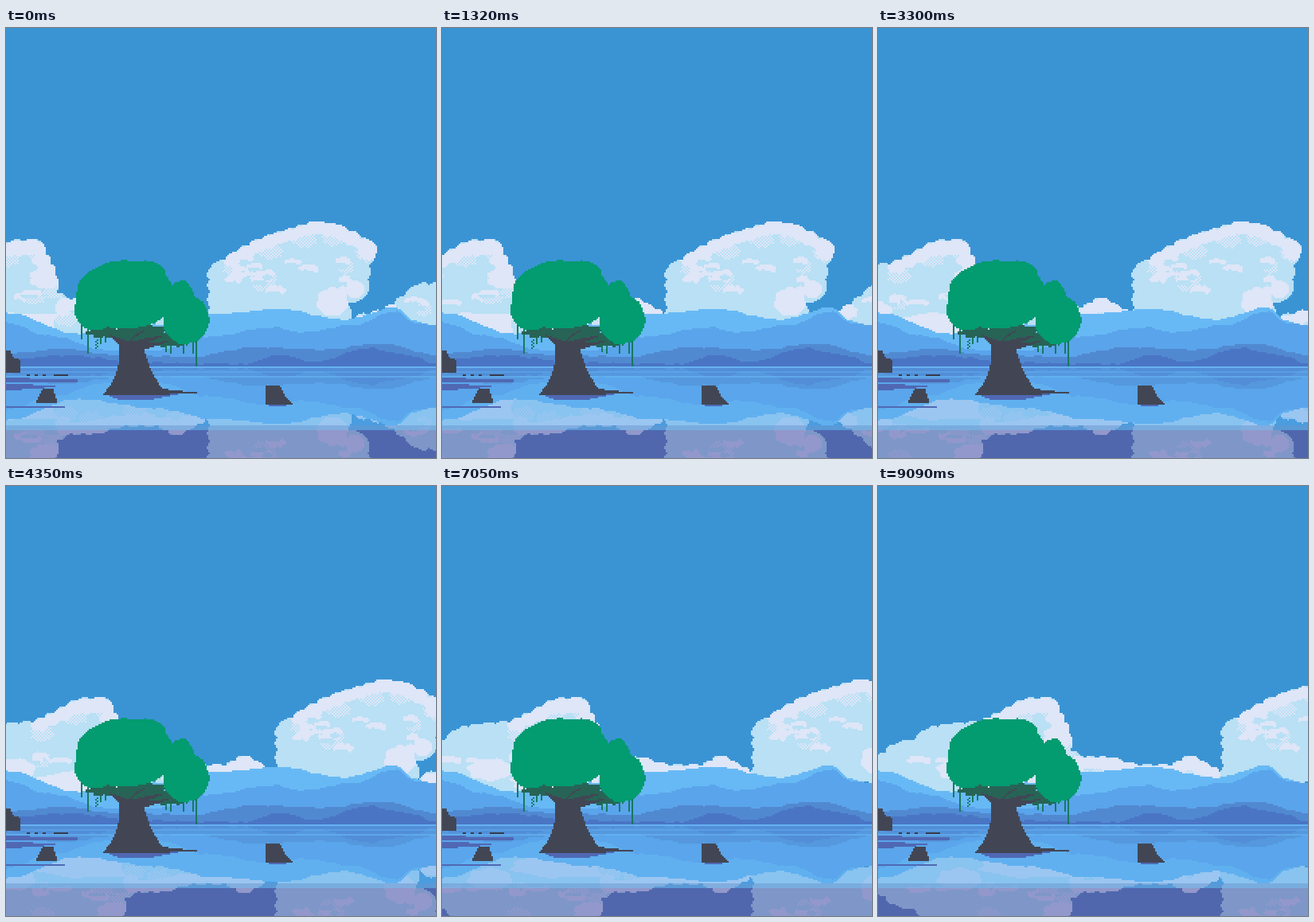
An HTML page with a canvas for the animation above (9.12 s loop, 540x540 px).

```html
<!DOCTYPE html>
<html lang="en">
<head>
<meta charset="utf-8">
<title>Lake</title>
<style>
  html, body { margin: 0; width: 100%; height: 100%; overflow: hidden; background: #3a94d4; }
  canvas { display: block; width: 540px; height: 540px; image-rendering: pixelated; }
</style>
</head>
<body>
<canvas id="stage" width="540" height="540"></canvas>
<script>
const ctx = document.getElementById('stage').getContext('2d');
ctx.imageSmoothingEnabled = false;
const LOOP = 9120, LEFT = 200, HORIZON = 425, SHORE = 505;
const SKY = '#3a94d4', TAU = Math.PI * 2;

function random(seed) {
  return (min, max) => {
    seed = (seed * 16807) % 2147483647;
    return min + (max - min) * seed / 2147483647;
  };
}
const pairs = flat => flat.flatMap((x, i) => i % 2 ? [] : [[x, flat[i + 1]]]);

// Layers hold art pixels of 2 x 2 stage pixels, whose rows start on odd stage rows.
function layer(width, left = 0) {
  const g = document.createElement('canvas').getContext('2d');
  g.canvas.width = width / 2;
  g.canvas.height = 270;
  g.translate(left / 2, 0);
  return g;
}

// Hard-edged polygon fill in stage coordinates, optionally as a checkerboard.
function poly(g, points, color, dither = false) {
  const pts = points.map(([x, y]) => [x / 2, (y - 1) / 2]);
  const ys = pts.map(p => p[1]);
  const end = Math.min(270, Math.ceil(Math.max(...ys)));
  g.fillStyle = color;
  for (let row = Math.max(0, Math.floor(Math.min(...ys))); row < end; row++) {
    const y = row + .5, cuts = [];
    pts.forEach(([x1, y1], i) => {
      const [x2, y2] = pts[(i + 1) % pts.length];
      if (y1 <= y !== y2 <= y) cuts.push(x1 + (y - y1) / (y2 - y1) * (x2 - x1));
    });
    cuts.sort((a, b) => a - b);
    for (let i = 0; i + 1 < cuts.length; i += 2) {
      const a = Math.round(cuts[i]), b = Math.round(cuts[i + 1]);
      if (!dither) g.fillRect(a, row, b - a, 1);
      else for (let x = a + ((a + row) & 1); x < b; x += 2) g.fillRect(x, row, 1, 1);
    }
  }
}

const bar = (g, x, y, w, h, color) => poly(g, [[x, y], [x + w, y], [x + w, y + h], [x, y + h]], color);

function blob(g, cx, cy, rx, ry, color, rough = .04, dither = false) {
  const pts = [];
  for (let a = 0; a < TAU; a += TAU / 40) {
    const r = 1 + rough * Math.sin(a * 7 + cx + cy);
    pts.push([cx + Math.cos(a) * rx * r, cy + Math.sin(a) * ry * r]);
  }
  poly(g, pts, color, dither);
}

// Limb that tapers from its root to a point.
const limb = (g, x, y, tipX, tipY, w, color) =>
  poly(g, [[x - w / 2, y + w / 2], [tipX, tipY], [x + w / 2, y - w / 2]], color);

// Cloud with puffs along a clockwise rim and light patches clipped to its body.
function cloud(g, { rim, seed, lit, box, count, spots = [] }, base, light) {
  const c = layer(540 + LEFT, LEFT), rand = random(seed);
  const corners = pairs(rim), outline = [], lumps = [];
  corners.forEach(([x, y], i) => {
    const [x2, y2] = corners[(i + 1) % corners.length];
    const dx = x2 - x, dy = y2 - y, length = Math.hypot(dx, dy);
    const puffs = Math.max(1, Math.round(length / 17));
    for (let k = 0; k < puffs * 5; k++) {
      const s = k / puffs / 5, out = 3 * Math.sin(k % 5 / 5 * Math.PI) / length;
      outline.push([x + dx * s + dy * out, y + dy * s - dx * out]);
      if (k % 5 === 2) lumps.push([x + dx * s - dy / length * 6, y + dy * s + dx / length * 6]);
    }
  });
  poly(c, outline, base);
  c.globalCompositeOperation = 'source-atop';

  const shown = lumps.filter(([x, y]) => x > lit[0] && x < lit[1] && y < lit[2]);
  shown.forEach(([x, y], i) => i % 3 || blob(c, x + 4, y + 11, 15, 10, light, .1, true));
  shown.forEach(([x, y]) => blob(c, x, y, rand(11, 15), rand(7, 10), light, .08));
  for (let i = 0; i < count; i++) {
    const x = rand(box[0], box[2]), y = rand(box[1], box[3]);
    const rx = rand(7, 15), ry = rand(4, 7);
    if (i % 4 === 0) blob(c, x + 3, y + 7, rx, ry + 3, light, .1, true);
    blob(c, x, y, rx, ry, light, .1);
    blob(c, x - 2, y + ry, rx * .8, ry * .7, base, .1);
  }
  spots.forEach(s => blob(c, ...s, light, .07));
  g.drawImage(c.canvas, -LEFT / 2, 0);
}

const CLOUDS = [
  { seed: 11, lit: [-55, 70, 330], box: [-160, 325, 40, 350], count: 7,
    rim: [-200,400, -180,343, -158,325, -133,320, -116,305, -88,300, -51,297, -24,285,
      4,269, 42,267, 50,284, 62,308, 64,332, 88,348, 92,400],
    spots: [[20, 277, 26, 9], [-76, 356, 28, 14], [46, 314, 16, 13], [20, 372, 70, 14]] },
  { seed: 5, lit: [60, 255, 365], box: [90, 354, 240, 358], count: 0,
    rim: [60,400, 66,341, 112,342, 150,352, 190,352, 215,339, 252,360, 256,400] },
  { seed: 8, lit: [430, 492, 370], box: [510, 340, 540, 355], count: 2,
    rim: [432,400, 438,363, 474,355, 500,337, 518,322, 545,323, 560,400] },
  { seed: 29, lit: [250, 470, 300], box: [285, 288, 440, 332], count: 15,
    rim: [255,372, 256,330, 255,303, 275,290, 305,272, 335,260, 364,251, 390,244, 416,248,
      445,262, 466,275, 456,298, 453,335, 430,346, 432,370],
    spots: [[410, 344, 20, 18], [438, 328, 12, 11]] },
];
function clouds(base, light) {
  const g = layer(540 + LEFT, LEFT);
  CLOUDS.forEach(c => cloud(g, c, base, light));
  return g.canvas;
}

// Ridge eased between key points, filled down to the horizon.
function ridge(g, flat, color) {
  const keys = pairs(flat);
  for (let x = 0; x < 540; x += 2) {
    const i = keys.findIndex(k => k[0] > x);
    const [x1, y1] = keys[i - 1], [x2, y2] = keys[i];
    const ease = (1 - Math.cos((x - x1) / (x2 - x1) * Math.PI)) / 2;
    const y = y1 + (y2 - y1) * ease + Math.sin(x * .23 + y1) * Math.sin(x * .07);
    bar(g, x, y, 2, HORIZON - y, color);
  }
}
function hills() {
  const g = layer(540);
  ridge(g, [0,358, 90,384, 190,372, 260,359, 340,353, 425,366, 488,351, 512,368, 541,374], '#67b9f5');
  ridge(g, [0,370, 50,386, 130,405, 190,405, 250,388, 335,376, 370,382, 430,374, 490,356, 512,371, 541,374], '#5aa4eb');
  ridge(g, [0,409, 70,403, 140,411, 230,413, 310,401, 400,404, 470,396, 541,411], '#5189d0');
  ridge(g, [0,416, 75,411, 170,420, 295,422, 345,411, 385,419, 455,402, 500,410, 541,422], '#4a75c5');
  return g.canvas;
}

function foreground() {
  const g = layer(540), rand = random(77);
  const DARK = '#424654', SHADE = '#5068b4', LEAF = '#039b70', UNDER = '#276456', VINE = '#16795f';
  const shape = (flat, color) => poly(g, pairs(flat), color);

  // shadows and driftwood
  shape([0,439, 60,441, 118,443, 60,445, 0,445], SHADE);
  shape([0,447, 68,449, 40,453, 0,455], SHADE);
  shape([0,475, 74,475, 74,477, 0,477], SHADE);
  shape([124,460, 216,460, 182,467, 142,467], SHADE);
  shape([326,471, 358,471, 350,475, 332,475], SHADE);
  for (let x = 26; x < 80; x += rand(8, 16)) bar(g, x, 435, rand(4, 13), 2, '#363a49');

  // rock and stumps
  shape([0,404, 6,406, 8,413, 18,417, 18,432, 0,434], DARK);
  shape([37,472, 46,453, 59,453, 65,472], DARK);
  shape([326,473, 326,450, 344,449, 349,460, 360,473], DARK);

  // hanging vines, lower towards the right
  for (let x = 94; x < 240; x += rand(4, 9)) {
    if (x > 138 && x < 180) continue;
    const top = 374 + (x - 94) / 9;
    bar(g, x & ~1, top, 2, 10 + 24 * rand(0, 1) ** 2, VINE);
  }
  for (let y = 391; y < 403; y += 2) bar(g, 110 + y % 4, y, 2, 2, VINE);

  // shaded leaves below the crown
  blob(g, 122, 381, 20, 8, UNDER, .15);
  blob(g, 168, 384, 34, 13, UNDER, .1);
  blob(g, 206, 391, 24, 9, UNDER, .15);

  // trunk flaring into its roots
  for (let y = 393; y < 461; y += 2) {
    const s = Math.max(0, (y - 400) / 60);
    const left = 142 - 22 * s ** 3;
    bar(g, left, y, 174 + 28 * s ** 1.6 - left, 2, DARK);
  }
  limb(g, 192, 457, 240, 458, 8, DARK);
  limb(g, 150, 398, 128, 385, 9, DARK);
  limb(g, 168, 402, 208, 393, 12, DARK);
  limb(g, 160, 398, 200, 386, 14, DARK);

  // crown
  blob(g, 150, 335, 62, 43, LEAF, .01);
  blob(g, 112, 353, 26, 27, LEAF, .02);
  blob(g, 172, 310, 29, 18, LEAF, .02);
  blob(g, 220, 350, 18, 33, LEAF, .02);
  blob(g, 226, 366, 29, 31, LEAF, .02);
  limb(g, 158, 381, 200, 376, 9, UNDER);
  limb(g, 150, 383, 132, 378, 8, UNDER);
  limb(g, 158, 390, 178, 377, 10, DARK);
  return g.canvas;
}

const day = clouds('#b9e0f4', '#dee6f8');
const dusk = clouds('#7e97c8', '#9298cb');
const land = hills(), front = foreground();

// The wind is slightly stronger at both ends of the loop.
const drift = s => Math.round(178.4 * s + 2 * Math.sin(TAU * s));

function rect(y, h, color) {
  ctx.fillStyle = color;
  ctx.fillRect(0, y, 540, h);
}
const put = (img, x = 0) => ctx.drawImage(img, x, 1, img.width * 2, 540);

function mirrored(top, sky, draw) {
  ctx.save();
  ctx.beginPath();
  ctx.rect(0, top, 540, 540 - top);
  ctx.clip();
  rect(top, 540 - top, sky);
  ctx.translate(0, 2 * HORIZON);
  ctx.scale(1, -1);
  draw();
  ctx.restore();
}

function frame() {
  const t = Math.floor(performance.now() % LOOP / 30) * 30;
  const x = drift(t / LOOP) - LEFT;
  rect(0, 540, SKY);
  put(day, x);
  put(land);

  mirrored(HORIZON, SKY, () => { put(day, x); put(land); });
  rect(HORIZON, 115, 'rgba(91,168,236,.5)');
  rect(HORIZON, 2, '#66b2f1');
  rect(431, 2, 'rgba(104,184,245,.35)');
  rect(437, 2, 'rgba(104,184,245,.6)');

  rect(SHORE - 6, 6, 'rgba(104,150,205,.5)');
  mirrored(SHORE, '#5067ae', () => put(dusk, x));

  put(front);
  requestAnimationFrame(frame);
}
frame();
</script>
</body>
</html>
```
